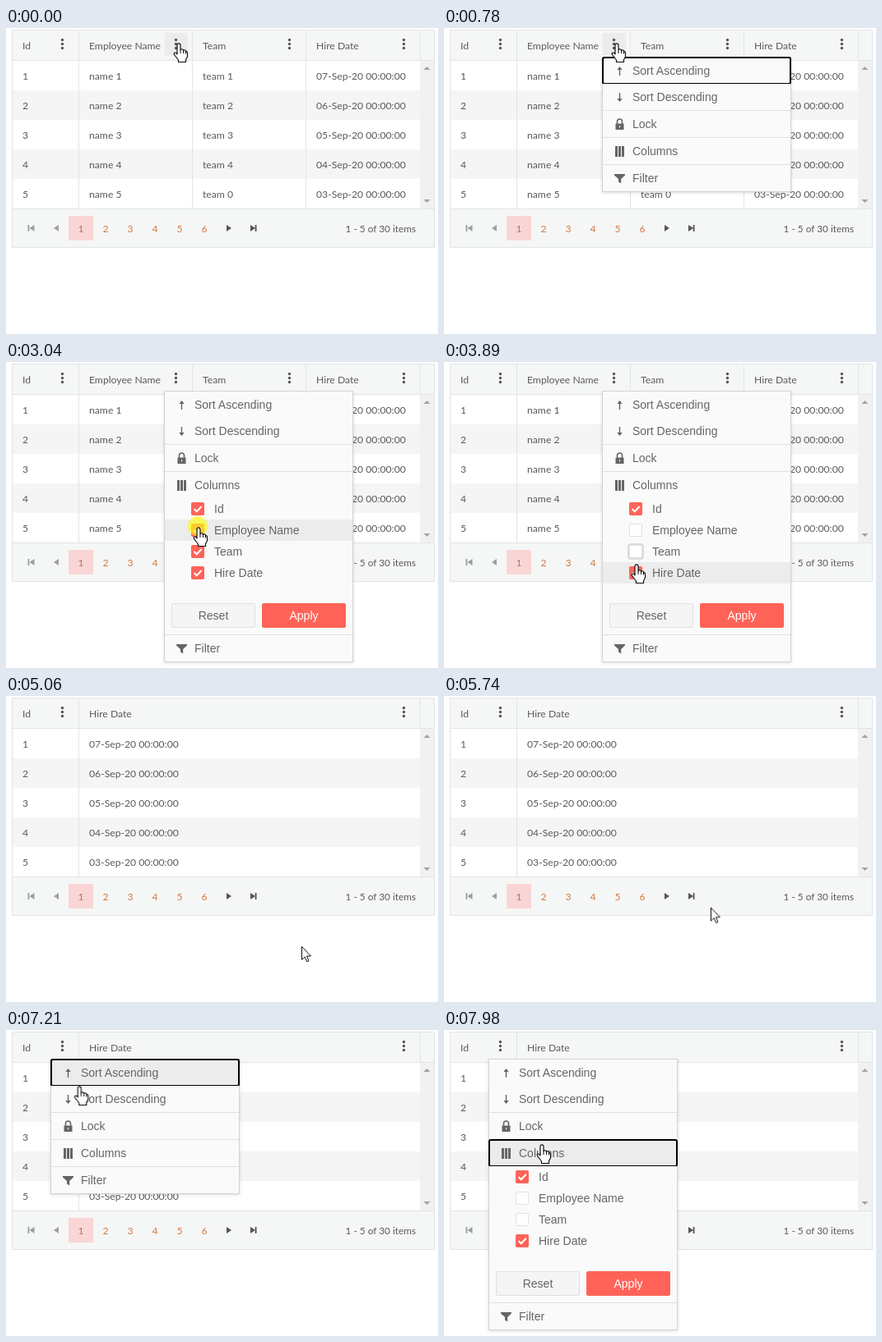
An HTML page that plays this animation: 525x373 px, repeating every 8000 ms.

```html
<!DOCTYPE html>
<html lang="en">
<head>
<meta charset="utf-8">
<title>Grid column menu</title>
<style>
  html, body { margin: 0; width: 100%; height: 100%; overflow: hidden; background: #fff; }
  svg { display: block; }
  #grid, #pointer { position: absolute; left: 0; top: 0; }
  #grid text { font: 12.2px Lato, "Open Sans", sans-serif; fill: #5a5a5a; }
  #grid text.info { font-size: 11.8px; }
  .pop { position: absolute; left: 182px; top: 35px; width: 250px; height: 338px; overflow: hidden; }
  .menu { position: absolute; left: 10px; top: 0; width: 228px; border: 1px solid #d3d3d3; background: #fafafa;
    box-shadow: 0 1px 4px rgba(0,0,0,.14); font: 14px/32px "Liberation Sans", Arial, sans-serif; color: #656565; }
  .item { position: relative; height: 32px; padding-left: 36px; }
  .line { border-top: 1px solid #dfdfdf; }
  .item svg { position: absolute; left: 12px; top: 8px; }
  .ring { position: absolute; inset: -1px; border: 2px solid #000; border-radius: 3px; opacity: 0; }
  .panel { position: relative; height: 0; overflow: hidden; }
  .opt { position: relative; height: 26px; line-height: 26px; padding-left: 60px; }
  .box { position: absolute; left: 32px; top: 5px; width: 14px; height: 14px; border: 1px solid #e2e2e2;
    border-radius: 2px; background: #fff; }
  .box svg { position: absolute; left: -1px; top: -1px; }
  .btn { position: absolute; top: 128px; height: 28px; line-height: 29px; width: 100px; text-align: center;
    border: 1px solid #e0e0e0; border-radius: 2px; background: #f5f5f5; }
  .apply { background: #ff6358; border-color: #ff6358; color: #fff; }
</style>
</head>
<body>
<svg id="grid" width="525" height="373"></svg>
<div class="pop"><div class="menu"></div></div>
<svg id="pointer" width="525" height="373"></svg>
<script>
const LOOP = 8000;
const $ = s => document.querySelector(s);

// Hold each value from its time until the next one.
function hold(el, prop, steps) {
  const keys = steps.map(([t, v]) => ({ offset: t / LOOP, [prop]: v, easing: 'step-end' }));
  keys.push({ offset: 1, [prop]: steps.at(-1)[1] });
  el.animate(keys, { duration: LOOP, iterations: Infinity });
}
function showIn(el, ...spans) {
  const steps = spans[0][0] > 0 ? [[0, 0]] : [];
  for (const [a, b] of spans) {
    steps.push([a, 1]);
    if (b < LOOP) steps.push([b, 0]);
  }
  hold(el, 'opacity', steps);
}
function add(parent, tag, attrs = {}, text) {
  const el = document.createElementNS('http://www.w3.org/2000/svg', tag);
  for (const k in attrs) el.setAttribute(k, attrs[k]);
  if (text !== undefined) el.textContent = text;
  return parent.appendChild(el);
}
const rect = (p, x, y, width, height, fill, more) => add(p, 'rect', { x, y, width, height, fill, ...more });
const label = (p, x, y, text, more) => add(p, 'text', { x, y, ...more }, text);
const path = (p, d, fill) => add(p, 'path', { d, fill });

// Pointer route: [time, x, y]
const route = [[0, 209, 17]];
function move(t0, t1, n, x, y) {
  const [, x0, y0] = route.at(-1);
  for (let i = 1; i <= n; i++) {
    const k = i / n, e = k * k * (3 - 2 * k);
    const t = n > 1 ? t0 + (t1 - t0) * (i - 1) / (n - 1) : t0;
    route.push([t, x0 + (x - x0) * e, y0 + (y - y0) * e]);
  }
}
move(1010, 1470, 7, 252, 148);
move(2500, 2890, 6, 233, 200);
move(3280, 3510, 4, 233, 228);
move(3820, 3820, 1, 233, 235);
move(3890, 3890, 1, 233, 245);
move(3970, 4660, 10, 359, 303);
move(5060, 5060, 1, 359, 305);
move(5520, 5596, 2, 333, 266);
move(5672, 6280, 9, 69, 21);
move(7050, 7520, 7, 118, 138);

const presses = [[230, 390], [1640, 1790], [3040, 3200], [3590, 3740], [4740, 4900], [6350, 6520], [7670, 7820]];
const APPLIED = 4900;

// Grid
const grid = $('#grid'), edge = '#e2e5e4';
rect(grid, 7.5, 2.5, 513, 265, '#f5f7f6', { stroke: edge });
for (let r = 0; r < 5; r++) {
  const y = 40 + r * 36;
  rect(grid, 8, y, 495, 36, r % 2 ? '#f5f5f5' : '#fff');
  const hover = rect(grid, 8, y, 495, 36, '#ececec', { opacity: 0 });
  hold(hover, 'opacity', route.map(([t, , py]) => [t, t > 5500 && t < 6300 && py >= y && py < y + 36 ? 1 : 0]));
}
rect(grid, 503, 40, 17, 180, '#f1f1f1');
path(grid, 'M507.5 51l4-4 4 4zM507.5 209l4 4 4-4z', '#a3a3a3');
rect(grid, 8, 39, 512, 1, edge);
rect(grid, 8, 220, 512, 1, edge);
rect(grid, 88, 3, 1, 217, edge);
rect(grid, 503, 3, 1, 36, edge);

function button(p, x, hovers, focus) {
  const b = rect(p, x - 13, 6, 28, 28, '#ececec', { opacity: 0 });
  showIn(b, hovers);
  const f = rect(p, x - 13, 6, 28, 28, 'none', { stroke: '#cfcfcf', 'stroke-width': 2, opacity: 0 });
  showIn(f, focus);
}
function kebab(p, x) {
  for (const y of [14.5, 19.5, 24.5]) add(p, 'circle', { cx: x + .5, cy: y, r: 1.7, fill: '#555' });
}
function column(p, x, title, cell) {
  label(p, x, 26, title);
  for (let r = 0; r < 5; r++) label(p, x, 63 + r * 36, cell(r));
}
const date = r => `0${7 - r}-Sep-20 00:00:00`;

button(grid, 68, [6280, 7050], [6350, 6900]);
kebab(grid, 68);
kebab(grid, 483);
column(grid, 20, 'Id', r => r + 1);

const full = add(grid, 'g'), short = add(grid, 'g');
for (const x of [226, 364]) rect(full, x, 3, 1, 217, edge);
button(full, 206, [0, 1010], [230, 780]);
kebab(full, 206);
kebab(full, 344);
column(full, 101, 'Employee Name', r => `name ${r + 1}`);
column(full, 239, 'Team', r => `team ${(r + 1) % 5}`);
column(full, 377, 'Hire Date', date);
column(short, 101, 'Hire Date', date);
showIn(full, [0, APPLIED]);
showIn(short, [APPLIED, LOOP]);

// Pager
rect(grid, 76, 229, 30, 30, '#f9d6d5');
for (let n = 1; n < 7; n++)
  label(grid, 61 + n * 30, 249, n, { 'text-anchor': 'middle', style: `fill:${n > 1 ? '#d3793f' : '#b5756a'}` });
path(grid, 'M26.5 240h1.8v8h-1.8zM34.5 240v8l-6-4zM64 240v8l-6-4z', '#9c9f9e');
path(grid, 'M268 240v8l6-4zM297 240v8l6-4zM302.7 240h1.8v8h-1.8z', '#555');
label(grid, 498, 249, '1 - 5 of 30 items', { 'text-anchor': 'end', class: 'info' });

// Column menu
const icons = {
  up: '<path d="M8.5 14V5" stroke="#656565" stroke-width="1.4"/><path d="M5.3 7l3.2-4 3.2 4z"/>',
  down: '<path d="M8.5 3v9" stroke="#656565" stroke-width="1.4"/><path d="M5.3 10l3.2 4 3.2-4z"/>',
  lock: '<path d="M5.5 8V5a3 3 0 0 1 6 0v3" fill="none" stroke="#656565" stroke-width="1.6"/>' +
    '<path d="M3.5 7.5h10v7.5h-10zM8 10v2.5h1V10z" fill-rule="evenodd"/>',
  columns: '<path d="M3 2h3v13H3zM7 2h3v13H7zM11 2h3v13h-3z"/>',
  filter: '<path d="M2 3h13v1.5L10.2 9v5.5L7 12.5V9L2 4.5z"/>'
};
const item = (icon, text, line) => `<div class="item row${line ? ' line' : ''}">
  <svg width="17" height="17" fill="#656565">${icons[icon]}</svg>${text}<div class="ring"></div></div>`;
const option = text => `<div class="opt row"><div class="box"><svg width="16" height="16">
  <rect width="16" height="16" rx="2" fill="#ff6358"/>
  <path d="M3.5 8l3.3 3.3L12.7 5" fill="none" stroke="#fff" stroke-width="2"/></svg></div>${text}</div>`;

const menu = $('.menu');
menu.innerHTML = item('up', 'Sort Ascending') + item('down', 'Sort Descending') +
  item('lock', 'Lock', true) + item('columns', 'Columns', true) +
  '<div class="panel">' + ['Id', 'Employee Name', 'Team', 'Hire Date'].map(option).join('') +
  '<div class="btn" style="left:8px">Reset</div><div class="btn apply" style="left:118px">Apply</div></div>' +
  item('filter', 'Filter', true);

const slide = t => [[t + 240, -108], [t + 310, -57], [t + 390, -20], [t + 470, 0]];
hold(menu, 'transform', [[0, -380], ...slide(230), [4900, -170], [4980, -300], [5060, -380], ...slide(6350)]
  .map(([t, y]) => [t, `translateY(${y}px)`]));
hold($('.pop'), 'transform', [[0, 'none'], [6000, 'translateX(-138px)']]);

const grow = t => [[t, '88px'], [t + 80, '146px'], [t + 160, '166px']];
hold($('.panel'), 'height', [[0, '0px'], ...grow(1790), [5060, '0px'], ...grow(7820)]);

const rings = document.querySelectorAll('.ring');
showIn(rings[0], [780, 1640], [6900, 7670]);
showIn(rings[3], [1640, 3040], [7670, LOOP]);

const tops = [36, 68, 101, 134, 166, 192, 218, 244];
const rows = document.querySelectorAll('.row');
tops.forEach((top, i) => {
  const end = tops[i + 1] || 270;
  hold(rows[i], 'backgroundColor', route.map(([t, , y]) => [t, y >= top && y < end ? '#ececec' : '#fafafa']));
});

const boxes = document.querySelectorAll('.box');
function uncheck(i, from, blur) {
  showIn(boxes[i].firstChild, [0, from]);
  const off = '0 0 0 2px rgba(0,0,0,0)';
  hold(boxes[i], 'boxShadow', [[0, off], [from, '0 0 0 2px rgba(0,0,0,.12)'], [blur, off]]);
}
uncheck(1, 3200, 3590);
uncheck(2, 3740, 4900);

// Pointer
const pointer = add($('#pointer'), 'g');
const spot = add(pointer, 'circle', { r: 12, fill: '#fafa14', 'fill-opacity': .68, opacity: 0 });
const ink = { fill: '#fff', stroke: '#111', 'stroke-width': 1.2, 'stroke-linejoin': 'round' };
const hand = add(pointer, 'g', { ...ink, transform: 'translate(1 1)' });
add(hand, 'path', { d: 'M-2 14V3Q-2 .8 0 .8T2 3V9Q2 7.5 3.8 7.8T5.5 9.5Q6 8.5 7.5 9T8.5 10.8Q10.5 10.3 10.5 12.5V17L8.5 20.5V23.5H-.5V21L-5.5 14.5Q-6.3 12-4.5 12T-2 14Z' });
add(hand, 'path', { d: 'M2 9v4M5.5 9.5V13M8.5 11v2.5', fill: 'none', 'stroke-width': 1 });
const arrow = add(pointer, 'path', { ...ink, 'stroke-width': 1, d: 'M.5.5V16.5L4.2 13L6.7 18.8L9 17.8L6.5 12H11.5Z' });
hold(pointer, 'transform', route.map(([t, x, y]) => [t, `translate(${x.toFixed(1)}px, ${y.toFixed(1)}px)`]));
showIn(spot, ...presses);
showIn(hand, [0, 5060], [6280, LOOP]);
showIn(arrow, [5060, 6280]);
</script>
</body>
</html>
```
